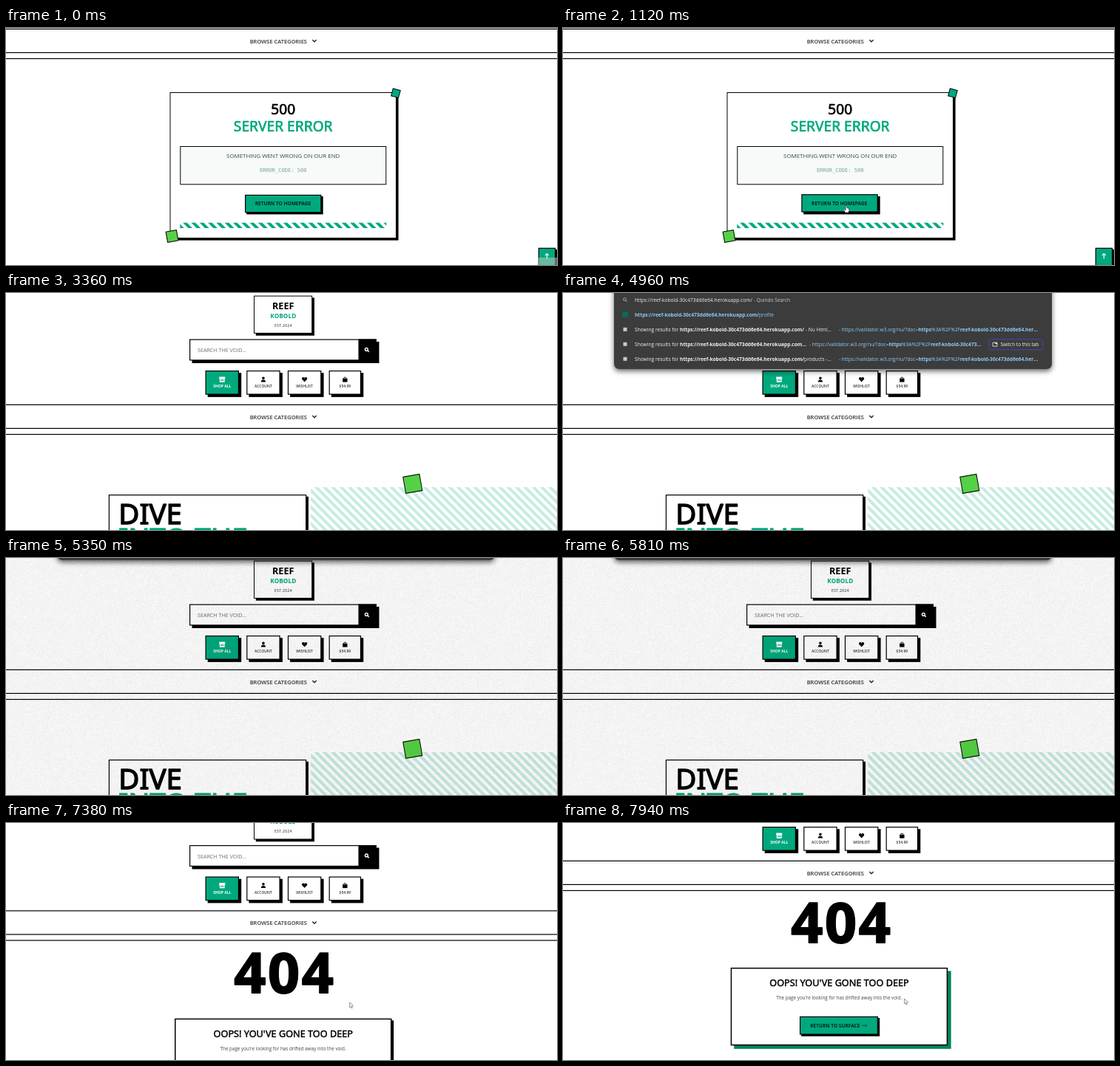
Write an HTML page with a canvas that moves like this. It is 745 px wide and 321 px high and loops after 8 s.

```html
<!DOCTYPE html>
<html lang="en">
<head>
<meta charset="utf-8">
<title>Error pages</title>
<style>
html, body { margin: 0; width: 100%; height: 100%; overflow: hidden; background: #fff; }
canvas { display: block; width: 745px; height: 321px; }
</style>
</head>
<body>
<canvas id="stage"></canvas>
<script>
const W = 745, H = 321, LOOP = 8000;
const TEAL = '#00a97d', GREEN = '#55d145', INK = '#000';
const BODY = '"Open Sans", sans-serif', HEAD = '"Noto Sans", sans-serif';
const MONO = '"DejaVu Sans Mono", monospace';
const HOST = 'reef-kobold-30c473dd6e64';
const SITE = 'https://' + HOST + '.herokuapp.com';

const canvas = document.getElementById('stage');
const dpr = window.devicePixelRatio || 1;
canvas.width = W * dpr;
canvas.height = H * dpr;
const c = canvas.getContext('2d');
c.lineJoin = 'round';

function rect(x, y, w, h, fill) {
  c.fillStyle = fill;
  c.fillRect(x, y, w, h);
}

// Bordered box with a hard offset shadow
function box(x, y, w, h, { fill = '#fff', line = 1.2, drop = 0, shade = INK } = {}) {
  if (drop) rect(x + drop, y + drop, w, h, shade);
  rect(x, y, w, h, INK);
  rect(x + line, y + line, w - 2 * line, h - 2 * line, fill);
}

// extra: outline width that gives weights between the installed ones
function text(s, x, y, size, { weight = 400, color = INK, font = BODY, align = 'center', gap = 0, extra = 0 } = {}) {
  c.font = `${weight} ${size}px ${font}`;
  c.letterSpacing = gap + 'px';
  c.textAlign = align;
  c.fillStyle = color;
  c.fillText(s, x, y);
  if (extra) {
    c.strokeStyle = color;
    c.lineWidth = extra;
    c.strokeText(s, x, y);
  }
  return c.measureText(s).width;
}

function title(s, x, y, size, options) {
  text(s, x, y, size, { font: HEAD, extra: size * .036, ...options });
}

function path(points, close) {
  c.beginPath();
  points.forEach(([x, y], i) => i ? c.lineTo(x, y) : c.moveTo(x, y));
  if (close) c.closePath();
}

function stroke(color, width) {
  c.strokeStyle = color;
  c.lineWidth = width;
  c.stroke();
}

function disc(x, y, r, color) {
  c.fillStyle = color;
  c.beginPath();
  c.arc(x, y, r, 0, 7);
  c.fill();
}

function tilted(x, y, size, deg, fill) {
  c.save();
  c.translate(x, y);
  c.rotate(deg * Math.PI / 180);
  box(-size / 2, -size / 2, size, size, { fill, line: 1 });
  c.restore();
}

function stripes(x, y, w, h, color, period, phase = 0) {
  c.save();
  c.beginPath();
  c.rect(x, y, w, h);
  c.clip();
  c.fillStyle = color;
  for (let sx = x - h - period + phase; sx < x + w; sx += period) {
    path([[sx, y], [sx + period / 2, y], [sx + period / 2 + h, y + h], [sx + h, y + h]], true);
    c.fill();
  }
  c.restore();
}

const icons = {
  store(x, y) {
    rect(x - 4, y - 3.5, 8, 3.2, '#fff');
    rect(x - 3.4, y - .5, 6.8, 4.3, '#fff');
    rect(x - 2.2, y + .4, 4.4, 1.3, TEAL);
  },
  user(x, y) {
    disc(x, y - 1.7, 1.8, INK);
    c.beginPath();
    c.arc(x, y + 3.5, 3.1, Math.PI, 0);
    c.fill();
  },
  heart(x, y) {
    disc(x - 1.7, y - 1.2, 1.9, INK);
    disc(x + 1.7, y - 1.2, 1.9, INK);
    path([[x - 3.4, y - .3], [x + 3.4, y - .3], [x, y + 3.5]], true);
    c.fill();
  },
  bag(x, y) {
    rect(x - 3.2, y - 1.2, 6.4, 4.8, INK);
    c.beginPath();
    c.arc(x, y - 1.2, 1.7, Math.PI, 0);
    stroke(INK, 1);
  },
  lens(x, y, color, width) {
    c.beginPath();
    c.arc(x - .6, y - .6, 1.9, 0, 7);
    stroke(color, width);
    path([[x + .8, y + .8], [x + 2.8, y + 2.8]]);
    stroke(color, width);
  }
};

function header() {
  box(335, 3.6, 79.2, 51.3, { line: 1, drop: 2.8 });
  text('REEF', 374.7, 22.4, 12.7, { weight: 800, font: HEAD });
  text('KOBOLD', 374.8, 33.9, 8.3, { weight: 700, color: TEAL });
  text('EST.2024', 375, 45.7, 5, { weight: 600, color: '#555', gap: .4 });

  box(248, 62.5, 253, 29, { line: 1.2, drop: 3.5 });
  rect(476.5, 62.5, 24.5, 29, INK);
  text('SEARCH THE VOID...', 259, 80.2, 7.15, { color: '#68736f', align: 'left' });
  icons.lens(488, 77, '#fff', 1.4);

  const links = [['SHOP ALL', 'store'], ['ACCOUNT', 'user'], ['WISHLIST', 'heart'], ['$54.99', 'bag']];
  links.forEach(([label, icon], i) => {
    const x = 269.5 + i * 55.7, w = i < 3 ? 45.5 : 43.5;
    box(x, 105, w, 32.7, { fill: i ? '#fff' : TEAL, drop: 3.2 });
    icons[icon](x + w / 2, 117);
    text(label, x + w / 2, 128.3, 5, { weight: i ? 600 : 700, color: i ? '#333' : '#fff' });
  });

  rect(0, 150.8, W, 1.2, INK);
  rect(0, 182.8, W, 1.2, INK);
  rect(0, 190.9, W, 1.2, INK);
  text('BROWSE CATEGORIES', 368.3, 170.5, 7.5, { weight: 600, color: '#333' });
  path([[414.3, 166], [417, 168.7], [419.7, 166]]);
  stroke('#222', 1.3);
}

function scrolledHeader(top) {
  c.save();
  c.translate(0, -top);
  header();
  c.restore();
}

function button(label, x, y, w, h, tx, lift) {
  box(x - lift, y - lift, w, h, { fill: TEAL, drop: 2.2 + lift });
  return text(label, tx - lift, y - lift + h / 2 + 2.3, 6.55, { weight: 700, color: '#06261c', align: 'left' });
}

function serverError(t, hover) {
  scrolledHeader(150);
  box(221.5, 87, 306.5, 198, { line: 1, drop: 2.6 });
  tilted(527, 88.2, 11.3, 15, TEAL);
  tilted(224.5, 282, 15.5, -10, GREEN);
  title('500', 374.7, 117, 19.2);
  title('SERVER ERROR', 374.7, 139.7, 19.2, { color: TEAL });
  box(235.3, 160, 279, 52.3, { fill: '#f7faf9', line: 1 });
  text('SOMETHING WENT WRONG ON OUR END', 374.7, 176.3, 7.9, { color: '#2e4a45' });
  text('ERROR_CODE: 500', 374.7, 194.5, 7.05, { color: '#78a09b', font: MONO });
  button('RETURN TO HOMEPAGE', 323, 225.8, 103.5, 24.4, 336.8, hover ? .7 : 0);
  stripes(235.3, 263.5, 279, 7.7, TEAL, 11.3);

  box(719.7, 297.7, 23.5, 30, { fill: TEAL, drop: 2.2 });
  path([[731.4, 312.8], [731.4, 305.6]]);
  stroke('#fff', 1.1);
  path([[728.9, 308.2], [731.4, 305.6], [733.9, 308.2]]);
  stroke('#fff', 1.1);
  if (t < 70) rect(720, 311, 25, 10, 'rgba(190,200,197,.55)');
}

function home() {
  header();
  stripes(412.3, 263, 333, 58, '#c6ece1', 11.3, 5.6);
  tilted(549.8, 258.4, 23.5, -10, GREEN);
  box(138.8, 273, 267.5, 70, { drop: 2.7 });
  title('DIVE', 152.3, 313, 38.5, { align: 'left' });
  title('INTO THE', 152.3, 346, 38.5, { align: 'left', color: TEAL });
}

function notFound(top, hover) {
  c.save();
  c.translate(0, -top);
  header();
  title('404', 308.3, 262, 75.5, { weight: 900, align: 'left', gap: 2.5, extra: 1.8 });
  const lift = hover ? 1.3 : 0;
  c.translate(-lift, -lift);
  box(228, 297.2, 293.5, 105.5, { line: 1.5, drop: hover ? 4.5 : 2.7, shade: hover ? '#00875f' : INK });
  title("OOPS! YOU'VE GONE TOO DEEP", 374.8, 322, 12.7);
  text("The page you're looking for has drifted away into the void.", 374.5, 340.6, 6.3, { color: '#444' });
  const end = 335.5 + button('RETURN TO SURFACE', 321.3, 363.2, 106, 24.8, 335.5, 0) + 3;
  path([[end, 375.6], [end + 6, 375.6]]);
  stroke('#06261c', .7);
  path([[end + 4.5, 374.2], [end + 6, 375.6], [end + 4.5, 377]]);
  stroke('#06261c', .7);
  c.restore();
}

// Runs of text set one after another: [string, colour, weight]
function runs(list, x, y) {
  for (const [s, color, weight = 400] of list)
    x += text(s, x, y, 6.65, { weight, color, align: 'left' });
}

function panel(bottom) {
  c.save();
  c.shadowColor = 'rgba(0,0,0,.6)';
  c.shadowBlur = 7 * dpr;
  c.shadowOffsetY = 3 * dpr;
  c.fillStyle = '#3c3c3c';
  c.beginPath();
  c.roundRect(69, -20, 592, bottom + 20, 7);
  c.fill();
  c.restore();
}

function suggestions() {
  const light = '#f0f0f0', blue = '#8fcbf8', grey = '#bbb';
  panel(103);
  icons.lens(84, 9.2, grey, .8);
  runs([[SITE + '/ ', light], ['- Quindo Search', '#ccc']], 97, 11.8);
  rect(80.3, 25.4, 7.6, 7.6, '#0b6b55');
  runs([[SITE + '/', blue, 700], ['profile', blue]], 97, 31.8);

  // Page path, page title, column of the address, its cut-off end
  const results = [
    ['/', ' - Nu Html...', 373, HOST + '.her...'],
    ['...', '', 333, HOST.slice(0, 18) + '...'],
    ['/products', ' -...', 373, HOST + '.her...']
  ];
  results.forEach(([tail, name, x, cut], i) => {
    const y = 51.8 + i * 20, [mark, rest] = [tail.match(/^\/|^\.+/)[0], tail.replace(/^\/|^\.+/, '')];
    rect(81.5, y - 5, 5, 5, '#c8c8c8');
    runs([['Showing results for ', light], [SITE + mark, light, 700], [rest + name, light]], 97, y);
    runs([['- ', grey], ['https://validator.w3.org/nu/?doc=', blue], ['https', blue, 700],
      ['%3A%2F%2F', blue], [cut, blue, 700]], x, y);
  });

  c.beginPath();
  c.roundRect(575.7, 62.8, 73, 14, 3);
  c.fillStyle = '#3c3c3c';
  c.fill();
  stroke('#4646b4', 1);
  c.strokeStyle = light;
  c.lineWidth = .8;
  c.strokeRect(581, 67.2, 6, 5);
  rect(584, 67.2, 3, 1.6, light);
  text('Switch to this tab', 591.5, 72, 6.5, { color: light, align: 'left' });
}

// Paper grain laid over the page while it reloads
const grain = document.createElement('canvas');
grain.width = W;
grain.height = H;
{
  const g = grain.getContext('2d'), img = g.createImageData(W, H);
  let seed = 7;
  for (let i = 3; i < img.data.length; i += 4) {
    seed = (seed * 1664525 + 1013904223) >>> 0;
    img.data[i] = 5 + 13 * seed / 2 ** 32;
  }
  g.putImageData(img, 0, 0);
}

// Pointer tip: time, x, y
const visits = [
  [[260, 672, 299], [560, 560, 280], [860, 420, 250], [1060, 383, 240], [1120, 383, 240], [1470, 374, 241],
   [1670, 374, 241], [1900, 377, 186], [1980, 377, 186], [2210, 375, 240], [2420, 376, 240],
   [2500, 376, 240], [2880, 398, 68], [2950, 400, -20]],
  [[6450, 440, -5], [6800, 466.5, 246], [7030, 466.5, 246], [7100, 466, 245], [7870, 461.7, 238], [8000, 461.7, 238]]
];

function smooth(p) {
  p = Math.min(1, Math.max(0, p));
  return p * p * (3 - 2 * p);
}

function pointerAt(t) {
  for (const keys of visits)
    for (let i = 1; i < keys.length; i++) {
      const [t0, x0, y0] = keys[i - 1], [t1, x1, y1] = keys[i];
      if (t >= t0 && t < t1) {
        const p = smooth((t - t0) / (t1 - t0));
        return { x: x0 + (x1 - x0) * p, y: y0 + (y1 - y0) * p };
      }
    }
  return null;
}

function pointer({ x, y }, hand) {
  c.save();
  c.translate(x, y);
  path(hand
    ? [[-.8, 0], [.6, 0], [.9, 3.6], [3.6, 4.5], [4, 6.5], [3, 10], [-1.2, 10], [-3.4, 6.4], [-2.6, 5.6], [-.9, 6.8]]
    : [[0, 0], [0, 7], [1.6, 5.6], [2.6, 8], [3.7, 7.5], [2.7, 5.2], [4.8, 5]], true);
  c.fillStyle = '#fff';
  c.fill();
  stroke(hand ? '#333' : '#666', .7);
  c.restore();
}

function draw(t) {
  c.setTransform(dpr, 0, 0, dpr, 0, 0);
  rect(0, 0, W, H, '#fff');
  const p = pointerAt(t);
  const hand = t < 3210 && !!p && p.x > 323 && p.x < 427 && p.y > 225 && p.y < 251;

  if (t < 3210) serverError(t, hand);
  else if (t < 6230) home();
  else notFound(100 * smooth((t - 7080) / 790), t >= 7920);

  if (t >= 5280 && t < 6230) c.drawImage(grain, 0, 0, W, H);
  if (t >= 4960 && t < 5280) suggestions();
  else if (t >= 5280 && t < 5950) panel(3);
  if (p) pointer(p, hand);
}

const start = performance.now();
function tick() {
  draw((performance.now() - start) % LOOP);
  requestAnimationFrame(tick);
}
tick();
</script>
</body>
</html>
```
